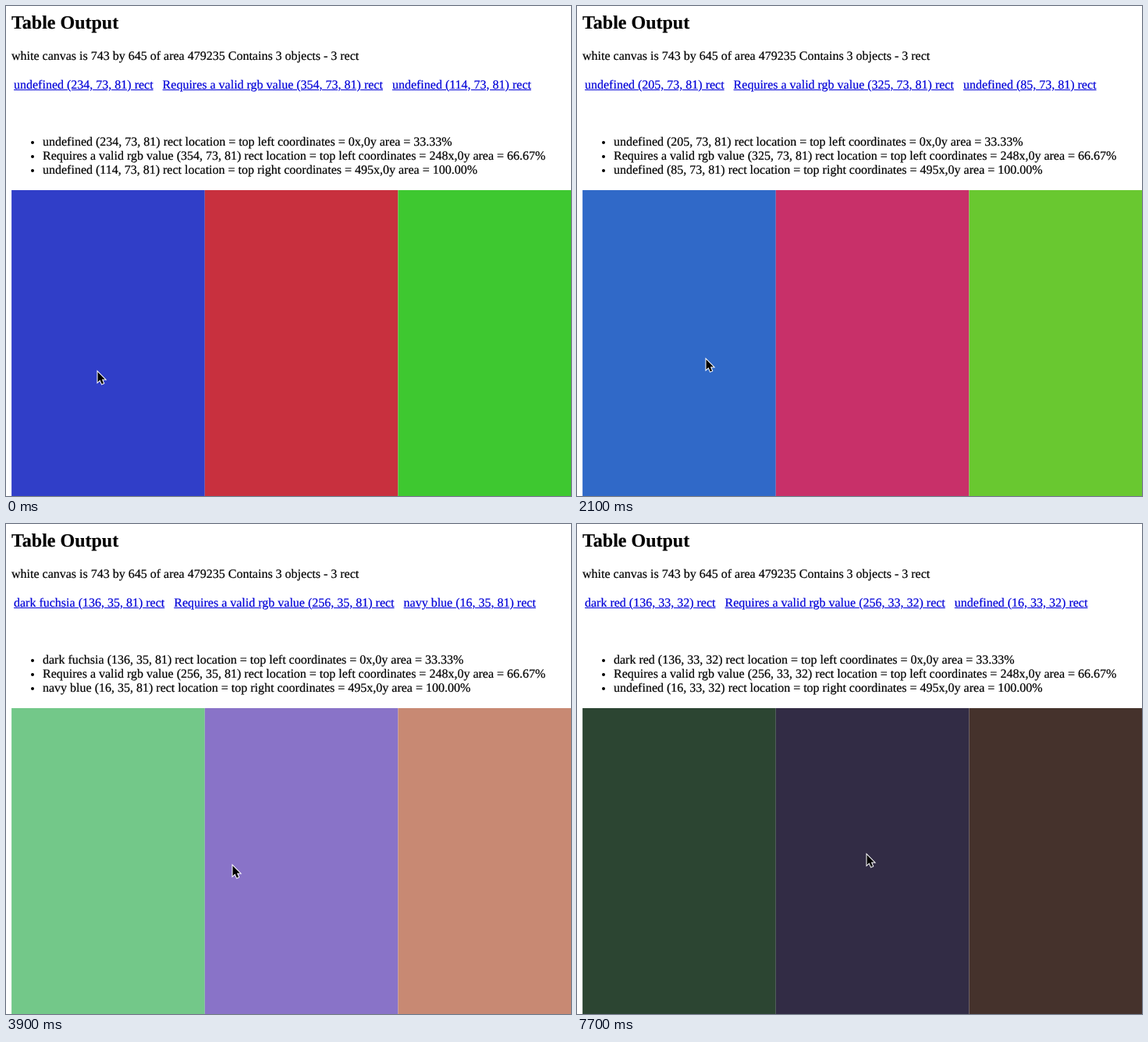
An HTML page that plays this animation: 724 by 628 pixels, repeating every 7.8 s.

```html
<!DOCTYPE html>
<html lang="en">
<head>
<meta charset="utf-8">
<title>Table Output</title>
<style>
html, body { margin: 0; width: 724px; height: 628px; overflow: hidden; background: #fff; }
body {
  position: relative; white-space: nowrap; color: #000;
  font: 16px/18px "Liberation Serif", "Times New Roman", serif;
  text-rendering: geometricPrecision; -webkit-text-stroke: .2px;
}
body > * { position: absolute; margin: 0; left: 7px; }
h2 { top: 8px; font-size: 24px; line-height: 28px; }
p { top: 56px; }
nav { top: 93px; left: 10px; }
nav span { color: #0000d8; text-decoration: underline; margin-right: 12px; }
ul { top: 166px; padding-left: 40px; }
svg { left: 0; top: 0; }
</style>
</head>
<body>
<h2>Table Output</h2>
<p>white canvas is 743 by 645 of area 479235 Contains 3 objects - 3 rect</p>
<nav><span></span><span></span><span></span></nav>
<ul><li></li><li></li><li></li></ul>
<svg width="724" height="628">
  <rect/><rect/><rect/>
  <path d="M.5 1V14L3.5 11.3L5.8 16.5L8.1 15.5L5.9 10.4H9.9Z" stroke="#fff" stroke-width="2" paint-order="stroke"/>
</svg>
<script>
const LOOP = 7800, STEP = 100, HUE_END = 3165, LEAD = 30;
const $$ = s => [...document.querySelectorAll(s)];
const links = $$('nav span'), items = $$('li'), bars = $$('rect'), [cursor] = $$('path');

bars.forEach((bar, i) => {
  const box = { x: 7.1 + i * 743 / 3, y: 236, width: 743 / 3, height: 392 };
  for (const name in box) bar.setAttribute(name, box[name]);
});

// Turning points [time, value], joined by cosine easing
const cursorX = [[0, 117], [2100, 165], [2800, 141], [3900, 290], [6100, 551], [7700, 371]];
const cursorY = [[0, 468], [1275, 380], [2505, 472], [HUE_END, 370], [3900, 437], [6100, 474], [7700, 423]];
const saturation = [[3200, 73], [3300, 22], [4300, 48], [5000, 26], [6100, 26], [6400, 33]];
const brightness = [[5000, 81], [5600, 50], [6100, 50], [6400, 32]];

function at(keys, t) {
  const i = keys.findIndex(k => k[0] > t);
  if (i < 1) return keys.at(i)[1];
  const [t0, a] = keys[i - 1], [t1, b] = keys[i];
  return a + (b - a) * (1 - Math.cos(Math.PI * (t - t0) / (t1 - t0))) / 2;
}

// The cursor's height sets the hue until HUE_END
const stateAt = t => [
  at(cursorY, Math.min(t, HUE_END)) - 234, at(saturation, t), at(brightness, t)
].map(Math.round);

// HSB to RGB, slightly darkened and softened like the recorded display
function color(h, s, v) {
  const channel = n => {
    const k = (n + h / 60) % 6;
    const c = v / 100 * (1 - s * .00975 * Math.max(0, Math.min(k, 4 - k, 1)));
    return Math.round(255 * c ** 1.15);
  };
  return `rgb(${channel(5)},${channel(3)},${channel(1)})`;
}

function names(s, v) {
  const soft = s < 60;
  const first = !soft ? 'undefined' : v > 60 ? 'dark fuchsia' : v > 40 ? 'dark magenta' : 'dark red';
  return [first, 'Requires a valid rgb value', soft && v > 60 ? 'navy blue' : 'undefined'];
}

const places = ['left coordinates = 0x,0y area = 33.33%', 'left coordinates = 248x,0y area = 66.67%',
  'right coordinates = 495x,0y area = 100.00%'];

function draw(t) {
  const [h, s, v] = stateAt(t);
  const [lh, ls, lv] = stateAt(t - STEP); // the text trails the bars by one step
  const title = names(ls, lv);
  [0, 120, -120].forEach((shift, i) => {
    const label = `${title[i]} (${lh + shift}, ${ls}, ${lv}) rect`;
    bars[i].setAttribute('fill', color(h + shift, s, v));
    links[i].textContent = label;
    items[i].textContent = `${label} location = top ${places[i]}`;
  });
  const x = Math.round(at(cursorX, t)), y = Math.round(at(cursorY, t + LEAD));
  cursor.setAttribute('transform', `translate(${x} ${y})`);
}

const start = performance.now();
let last = -1;
function tick() {
  const t = Math.floor((performance.now() - start) % LOOP / STEP) * STEP;
  if (t !== last) draw(last = t);
  requestAnimationFrame(tick);
}
tick();
</script>
</body>
</html>
```
